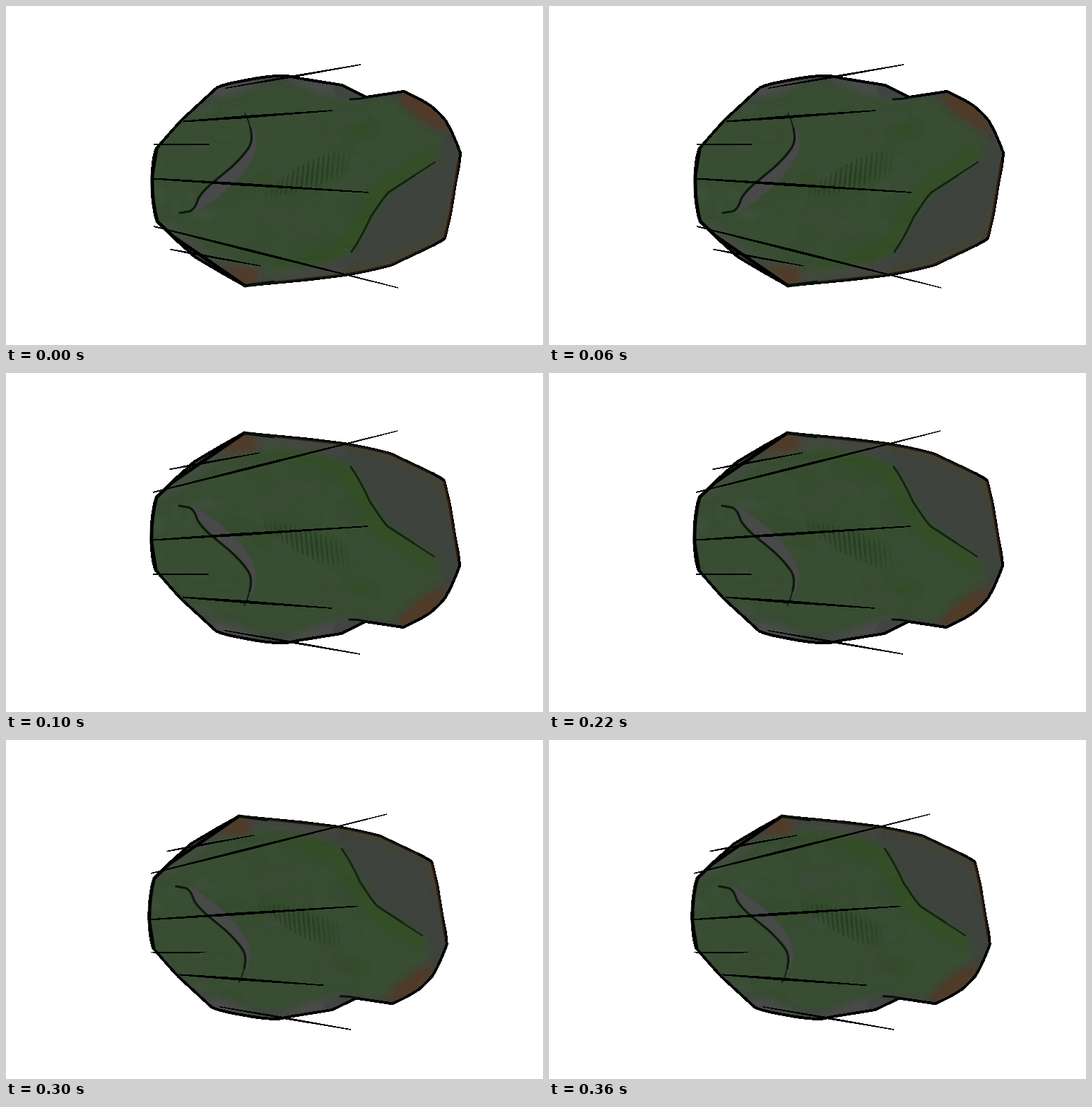
These frames come from a looping animation (760x480 px, 400 ms). An HTML page:

```html
<!DOCTYPE html>
<html lang="en">
<head>
<meta charset="utf-8">
<title>Tumbling rock</title>
<style>
  html, body { margin: 0; width: 100%; height: 100%; overflow: hidden; background: #fff; }
  svg { display: block; width: 760px; height: 480px; }
</style>
</head>
<body>
<svg viewBox="0 0 760 480">
  <defs>
    <path id="shape" d="M338 396 L304 377 L267 355 L236 327 L215 306 Q211 299 210 290 Q206 268 206.500 245 Q207 220 212 203
      Q228 184 249 161 L298 116 Q306 111 340 105 Q372 98.500 396 98.500 L416 102.500 L475 112 L510 129 L563 121
      Q588 132 602 142 Q614 152 622 162 Q633 180 643 208 Q642 225 637 246 L629 295 L621 329 Q615 334 600 341
      L545 367 Q515 375 480 381 Q430 388 380 392 Z"/>
    <clipPath id="inside"><use href="#shape"/></clipPath>
    <filter id="soft" x="-50%" y="-50%" width="200%" height="200%"><feGaussianBlur stdDeviation="5"/></filter>
    <filter id="faint" x="-50%" y="-50%" width="200%" height="200%"><feGaussianBlur stdDeviation="1.5"/></filter>
  </defs>
  <g id="rock">
    <g clip-path="url(#inside)">
      <use href="#shape" fill="#3e443d"/>
      <!-- moss -->
      <path filter="url(#soft)" fill="#394e33" d="M190 190 L250 160 L305 126 L350 112 L420 109 L470 126 L500 134 L550 131
        Q580 160 618 185 L612 214 L540 264 L515 302 L490 347 L440 368 L370 378 L290 360 L200 310 Z"/>
      <path fill="#394e33" d="M470 180 L607 221 L541 264 L516 299 L489 348 L430 340 Z" filter="url(#faint)"/>
      <g filter="url(#soft)" fill="none" stroke="#2e5020" stroke-opacity=".65" stroke-width="17" stroke-linejoin="round">
        <path d="M608 205 L580 226 L530 260 L505 300 L480 342 L430 364 L370 375"/>
        <path d="M375 268 L425 258 L470 228" stroke-opacity=".45"/>
      </g>
      <g id="mottle" filter="url(#soft)"></g>
      <!-- bare stone -->
      <g filter="url(#soft)" fill="#4b4b4b">
        <path d="M282 126 L300 112 L360 102 L350 114 L305 130 Z"/>
        <path d="M380 98 L475 112 L510 129 L485 133 L440 122 Z"/>
        <path d="M290 356 L370 372 L480 362 L480 384 L330 394 Z" opacity=".45"/>
        <path d="M206 300 L240 310 L310 362 L270 360 Z" opacity=".5"/>
      </g>
      <path filter="url(#faint)" fill="#414541" d="M462 113 L478 113 L508 129 L484 132 L468 128 Z"/>
      <!-- rust -->
      <g filter="url(#soft)" fill="#563a22">
        <path d="M552 122 L570 120 L610 147 L629 183 L598 168 L568 145 Z" opacity=".8"/>
        <path d="M304 368 L350 370 L358 384 L340 396 Z" opacity=".8"/>
        <path d="M643 240 L620 330 L545 368 L440 386 L540 358 L612 326 Z" opacity=".35"/>
      </g>
      <path filter="url(#faint)" fill="#484849" d="M345 162 Q358 183 354 203 C345 232 317 258 292 276 Q277 288 262 294
        L273 271 C289 250 317 232 337 210 Q350 196 345 162 Z"/>
    </g>
    <g id="hatch" fill="#1c3018"></g>
    <use href="#shape" fill="none" stroke="#000" stroke-width="4" stroke-linejoin="round" shape-rendering="crispEdges"/>
    <g fill="none" stroke-linecap="round" stroke-linejoin="round">
      <path d="M338 396 L236 326 L214 305 Q206 275 207 240 L213 203" stroke="#000" stroke-width="4.800"/>
      <path d="M640 220 L636 246 L628 295 L621 326" stroke="#321909" stroke-width="2.400"/>
      <path d="M600 340 L545 366 Q515 374 480 380 L380 391" stroke="#21170c" stroke-width="2"/>
      <path d="M487 132 Q500 132 513 129" stroke="#071006" stroke-width="3"/>
      <path d="M339 396 L379 391" stroke="#071006" stroke-width="4.500"/>
      <path d="M346 173 Q350 190 344 200 Q334 215 317 230 L289 253 Q276 265 272 273 Q267 290 258 291 L246 293"
        stroke="#0b1b0a" stroke-width="3.200"/>
      <path d="M338 152 Q343 160 346 174" stroke="#0b1b0a" stroke-width="1.700"/>
      <path d="M607 221 L576 241" stroke="#10240e" stroke-width="2.200"/>
      <path d="M578 240 L541 264 Q533 273 528 281 L516 299 Q503 328 489 348" stroke="#10240e" stroke-width="3"/>
    </g>
    <g id="streaks" shape-rendering="crispEdges"></g>
  </g>
</svg>
<script>
const byId = id => document.getElementById(id);

function add(parent, tag, attrs) {
  const node = document.createElementNS('http://www.w3.org/2000/svg', tag);
  for (const key in attrs) node.setAttribute(key, attrs[key]);
  parent.appendChild(node);
}

// A stroke that swells to its full width at `peak` (0..1) and thins out at both ends.
function taper(parent, x1, y1, x2, y2, width, peak, attrs = {}) {
  const dx = x2 - x1, dy = y2 - y1, k = width / 2 / Math.hypot(dx, dy);
  const nx = -dy * k, ny = dx * k;
  const at = (t, side) => `${x1 + dx * t + nx * side},${y1 + dy * t + ny * side}`;
  const points = [at(0, .5), at(peak, 1), at(1, .4), at(1, -.4), at(peak, -1), at(0, -.5)];
  add(parent, 'polygon', { points: points.join(' '), ...attrs });
}

let seed = 17;
function random() {
  seed = (seed * 16807) % 2147483647;
  return seed / 2147483647;
}

for (let i = 0; i < 45; i++) {
  const x = 212 + random() * 300;
  add(byId('mottle'), 'ellipse', {
    cx: x, cy: 125 + random() * 235,
    rx: 6 + random() * 20, ry: 4 + random() * 10,
    fill: x < 310 ? '#4c564c' : i % 2 ? '#454f43' : '#30491f',
    opacity: .15 + random() * .15
  });
}

for (let i = 0; i < 17; i++) {
  const t = i / 16;
  const x = 368 + t * 115;
  const top = 257 - 52 * Math.sin(t * Math.PI / 2);
  const length = 15 + 27 * Math.sin(t * Math.PI * .75);
  taper(byId('hatch'), x + 3, top, x - 1, top + length, 3.8, .65,
    { opacity: .1 + .4 * Math.sin(Math.PI * t) });
}

[
  [502, 83, 310, 116.5, 3.2, .5],
  [251, 163.5, 462, 148, 4.2, .4],
  [209, 196, 296, 196, 2, .4],
  [209, 244.5, 513, 264, 4.2, .4],
  [209, 312, 555, 399, 3.6, .4],
  [232, 344.5, 360, 368, 3.2, .3]
].forEach(line => taper(byId('streaks'), ...line));

const flipped = 'matrix(1 0 0 -1 -1 481)';
const poses = [
  { until: 100, transform: '' },
  { until: 300, transform: flipped },
  { until: 400, transform: 'translate(4.2 25.9) scale(.9653) ' + flipped }
];

function draw(now) {
  const time = now % 400;
  byId('rock').setAttribute('transform', poses.find(pose => time < pose.until).transform);
}

function tick() {
  draw(performance.now());
  requestAnimationFrame(tick);
}
tick();
</script>
</body>
</html>
```
